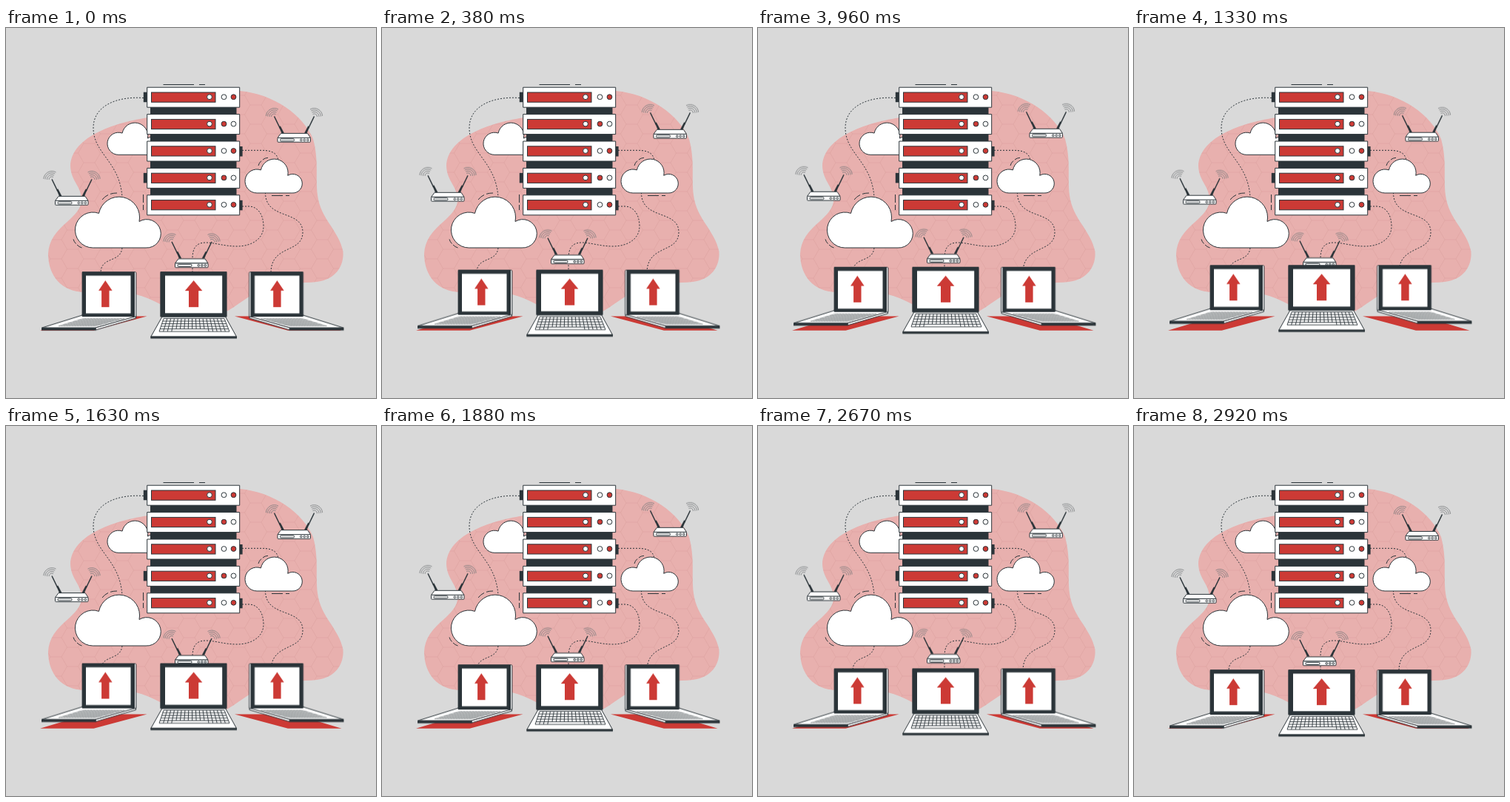
An HTML page for the animation above (3 s loop, 500 px wide and 500 px high).

```html
<!DOCTYPE html>
<html lang="en">
<head>
<meta charset="utf-8">
<title>Cloud server upload</title>
<style>
  html, body { margin: 0; width: 100%; height: 100%; overflow: hidden; background: #d9d9d9; }
  svg { display: block; width: 100vw; height: 100vh; }
  .line { fill: none; stroke: #2b3439; stroke-width: 1; }
  .dots { fill: none; stroke: #2b3439; stroke-width: 1; stroke-dasharray: 2 2; }
  .box { fill: #fff; stroke: #2b3439; stroke-width: 1; vector-effect: non-scaling-stroke; }
  .dark { fill: #2b3439; }
  .red { fill: #cc3a35; }
  .bar { fill: #cc3a35; stroke: #2b3439; }
  .rod { fill: none; stroke: #2b3439; stroke-width: 1.5; }
  .waves { fill: none; stroke: #77797b; stroke-width: .8; }
  .keys { fill: none; stroke: #2b3439; stroke-width: .9; }
  .fine { fill: none; stroke: #6f7477; stroke-width: .5; }
  .float { animation: lift 1500ms linear -40ms infinite alternate; }
  .quick { animation-duration: 750ms; }
  @keyframes lift {
    from { transform: translateY(.4px); }
    to { transform: translateY(-9.6px); }
  }
</style>
</head>
<body>
<svg viewBox="0 0 500 500">
  <defs>
    <pattern id="hex" width="45" height="26" patternUnits="userSpaceOnUse">
      <path d="M0 13H7.5L15 0H30L37.5 13H45M7.5 13L15 26H30L37.5 13" fill="none" stroke="#d79a98" stroke-width=".7" opacity=".6"/>
    </pattern>
    <path id="cloud" class="box" d="M117.5 297A24 24 0 1 1 125.5 250.4A27 27 0 0 1 180 261.5A19.2 19.2 0 1 1 189 297Z"/>
    <path id="blob" d="M200 120C150 126 88 146 87 187C88 208 103 214 102 235C98 260 59 268 57 305C57 336 76 356 105 357C150 353 178 356 210 374C240 391 272 394 300 382C320 370 334 356 358 350C380 344 400 345 420 343C445 340 457 322 455.5 302C450 274 425 258 421 226C418 200 423 180 415 150C402 118 362 89 316 85H250Z"/>

    <g id="antenna">
      <path class="rod" d="M62 204.5L70 221"/>
      <path class="dark" d="M68.3 218.5L70.3 217.5L75.3 227H71.8Z"/>
      <path class="waves" d="M58 205A4 4 0 0 1 64 201.5M55.5 205A6.5 6.5 0 0 1 65 199.2M53 204.5A9 9 0 0 1 66.2 197M50.8 204A11.3 11.3 0 0 1 67.5 195"/>
    </g>
    <g id="router">
      <use href="#antenna"/>
      <use href="#antenna" transform="matrix(-1 0 0 1 178 0)"/>
      <path class="box" d="M71 227.5H107L111 233.5H66.5Z"/>
      <rect class="box" x="66.5" y="233.5" width="44.5" height="5.8" rx=".8"/>
      <rect class="line" x="70" y="234.9" width="19" height="3" rx="1.3"/>
      <circle class="line" cx="98.3" cy="236.4" r="1.3"/>
      <circle class="line" cx="102.8" cy="236.4" r="1.3"/>
      <circle class="line" cx="107.3" cy="236.4" r="1.3"/>
    </g>

    <path id="shadow" class="red" d="M46 408.7H118.5L190.5 389.5H110Z"/>
    <g id="side">
      <path class="box" d="M103 388L48.5 405H121L175.5 390V387H103Z"/>
      <g id="sideKeys"></g>
      <path class="box" d="M121 405L175.5 389.5V392L121 408Z"/>
      <rect class="dark" x="48" y="404.8" width="73.5" height="3.7"/>
      <path class="box" d="M172 329.5H174.5Q175.8 329.5 175.8 331V390H172Z"/>
      <rect class="dark" x="102.6" y="329" width="71.4" height="61" rx="1"/>
      <rect fill="#fff" x="108" y="334.5" width="60.5" height="51"/>
    </g>
    <path id="arrow" class="red" d="M0 341L9.3 354.8H5.2V377H-5.2V354.8H-9.3Z"/>
  </defs>

  <use href="#blob" fill="#e8b0ae"/>
  <use href="#blob" fill="url(#hex)"/>

  <path class="dots" d="M186 94.5C150 92 118 105 118 135C118 170 154 180 157 229M157 297C155 318 128 308 128 331M319 165.3H345C361 165.3 367 170 368 180M350.5 222C350 260 401 245 401 276C401 305 358 292 358 331M319 241H328C340 241 348 252 348 268C348 285 332 295 312 295C295 295 282 290 270 290C255 290 252 300 252 312V331"/>

  <use href="#cloud" transform="translate(78.3 -15.2) scale(.628)"/>
  <use href="#cloud"/>
  <use href="#cloud" transform="translate(260.7 24.9) scale(.667)"/>
  <path class="line" d="M130 232Q133 228 138 225.5M141 224.3Q145 223 150 223M91 285.5Q92 289 94.5 291.5M96 293Q99 296 102.5 297M341 186Q342 182 345 179.5M347 178Q350 175.5 354 175.3M359 226.5H374M378 226.5H383M212.5 76.5H254M261 76.5H269M185.5 225V236M185.5 239V246"/>

  <g id="servers"></g>

  <g class="float quick">
    <use href="#router"/>
    <use href="#router" x="300.5" y="-85"/>
    <use href="#router" x="162" y="84.5"/>
  </g>

  <use href="#shadow"/>
  <use href="#shadow" transform="matrix(-1 0 0 1 499.5 0)"/>

  <g class="float">
    <use href="#side"/>
    <use href="#side" transform="matrix(-1 0 0 1 504.5 0)"/>
    <use href="#arrow" x="134.3"/>
    <use href="#arrow" x="366.4"/>

    <path class="box" d="M211 390H296.5L311.5 417H195.8Z"/>
    <rect class="dark" x="195.3" y="416.6" width="116.7" height="2.9" rx=".6"/>
    <path id="midKeys" class="keys"/>
    <rect class="dark" x="208.3" y="329" width="90.3" height="61.5" rx="1"/>
    <rect fill="#fff" x="215" y="334.5" width="77.2" height="50.7"/>
    <path class="red" d="M253.6 341L265.4 355H260.2V377H247V355H241.8Z"/>
  </g>
</svg>
<script>
  const byId = id => document.getElementById(id);
  const rect = (cls, x, y, w, h) =>
    `<rect class="${cls}" x="${x}" y="${y}" width="${w}" height="${h}"/>`;
  const light = (cls, x, y) => `<circle class="${cls}" cx="${x}" cy="${y}" r="3.4"/>`;

  // Server rack
  let rack = rect('dark', 195, 100, 116.5, 140);
  for (let i = 0; i < 5; i++) {
    const y = 80.2 + i * 36.4, mid = y + 13;
    if (i % 3 === 0) rack += rect('dark', 185.8, y + 6.5, 5, 13.5);
    if (i === 2 || i === 4) rack += rect('dark', 316, y + 7, 3.6, 13.5);
    rack += rect('box', 190.7, y, 125, 27)
      + rect('bar', 196.5, y + 6.8, 86.5, 13.2)
      + light('box', 275, mid)
      + light(i % 2 ? 'bar' : 'box', 294.5, mid)
      + light(i % 2 ? 'box' : 'bar', 307.5, mid);
  }
  byId('servers').innerHTML = rack;

  // Front keyboard: rows widen towards the viewer
  const rows = 5, cols = 17;
  const point = (u, v) => {
    const left = 213 - 6 * v, right = 295 + 7 * v;
    return `${(left + (right - left) * u).toFixed(2)} ${(392.5 + 17.5 * v).toFixed(2)}`;
  };
  let grid = '';
  for (let r = 0; r <= rows; r++) grid += `M${point(0, r / rows)}L${point(1, r / rows)}`;
  for (let c = 0; c <= cols; c++) {
    const space = c > 3 && c < 12;
    grid += `M${point(c / cols, 0)}L${point(c / cols, space ? 1 - 1 / rows : 1)}`;
  }
  byId('midKeys').setAttribute('d', grid);

  // Slanted keyboard of the side laptops
  let slant = '';
  for (let r = 0; r <= 5; r++) slant += `M${104 - 6.6 * r} ${392.5 + 2 * r}h${56 - r}`;
  for (let c = 0; c <= 14; c++) slant += `M${104 + c * 4} 392.5L${71 + c * 3.64} 402.5`;
  byId('sideKeys').innerHTML = `<path class="fine" d="${slant}"/>`;
</script>
</body>
</html>
```
